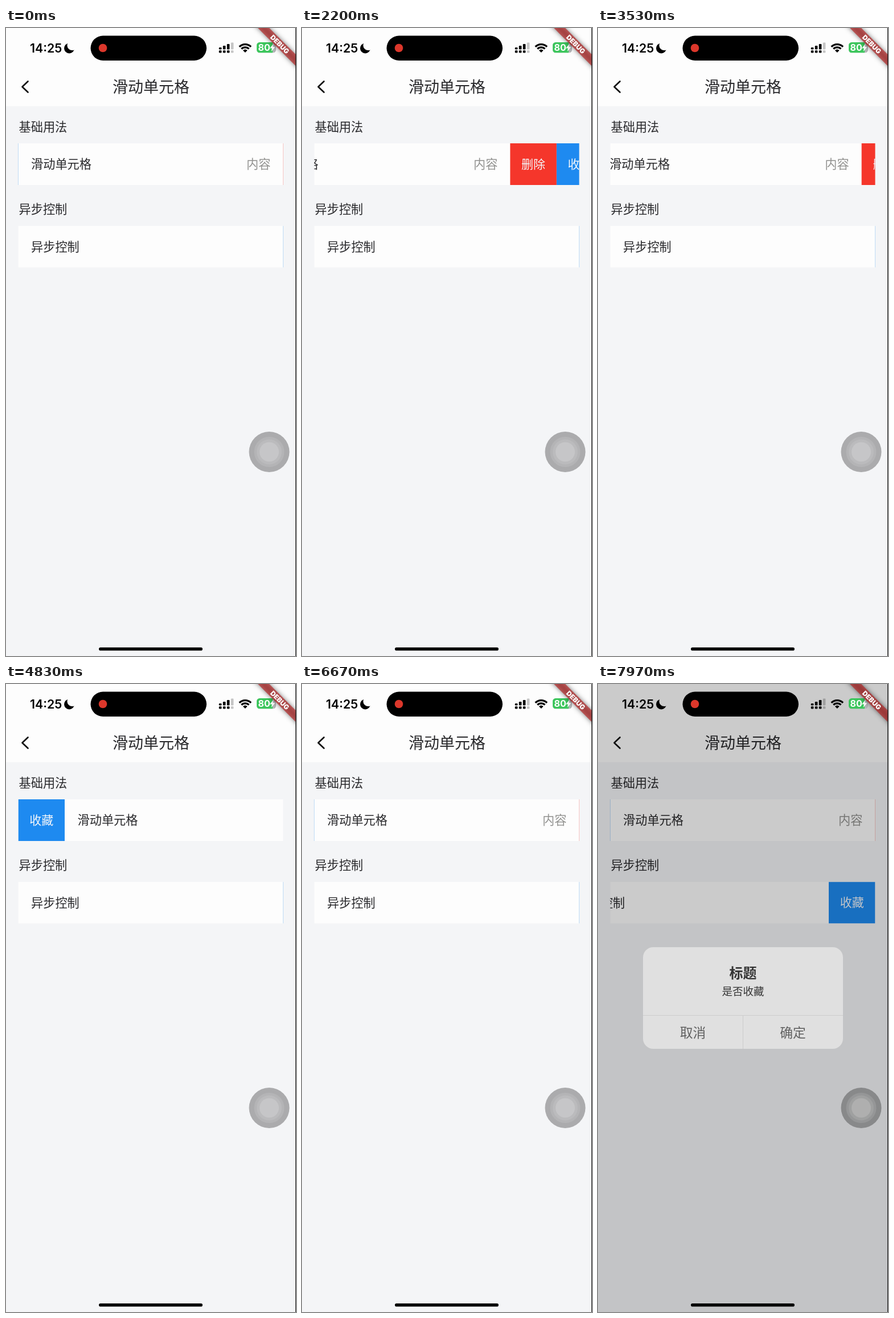
Write an HTML page with a canvas that moves like this. It is 509x1100 px and loops after 8 s.

```html
<!DOCTYPE html>
<html lang="zh-CN">
<head>
<meta charset="utf-8">
<title>滑动单元格</title>
<style>
html, body { margin: 0; width: 100%; height: 100%; overflow: hidden; background: #f4f5f7; }
canvas { display: block; width: 509px; height: 1100px; }
</style>
</head>
<body>
<canvas id="stage"></canvas>
<script>
const W = 509, H = 1100, LOOP = 8000;
const RED = '#f5362b', BLUE = '#1e8af0', INK = '#28282b', PAPER = '#fdfdfd';
const CARD = { x: 21.5, w: 465, h: 73 }, BTN = 81.5;
const CJK = '"Noto Sans CJK SC", "Noto Sans CJK", sans-serif';
const LATIN = 'Inter, sans-serif';

const canvas = document.getElementById('stage');
const ratio = window.devicePixelRatio || 1;
canvas.width = W * ratio;
canvas.height = H * ratio;
const c = canvas.getContext('2d');

// Each move: start, end, from, to
const firstMoves = [
  [1804, 2404, 0, -2 * BTN],
  [3306, 3606, -2 * BTN, 0],
  [4300, 4760, 0, BTN],
  [5480, 5800, BTN, 0]
];
const secondMoves = [[6900, 7350, 0, -BTN]];

const clamp = p => Math.min(1, Math.max(0, p));
const ease = p => (1 - Math.cos(Math.PI * p)) / 2;

function position(moves, t) {
  let x = 0;
  for (const [start, end, from, to] of moves) {
    if (t >= start) x = from + (to - from) * ease(clamp((t - start) / (end - start)));
  }
  return x;
}

function rect(x, y, w, h, color, r = 0) {
  c.fillStyle = color;
  c.beginPath();
  c.roundRect(x, y, w, h, r);
  c.fill();
}

function disc(x, y, r, color) {
  c.fillStyle = color;
  c.beginPath();
  c.arc(x, y, r, 0, 2 * Math.PI);
  c.fill();
}

function polygon(points, color) {
  c.fillStyle = color;
  c.beginPath();
  points.forEach(([x, y]) => c.lineTo(x, y));
  c.fill();
}

// y is the middle of the line
function text(s, x, y, size, color = INK, align = 'left', weight = 350) {
  c.font = `${weight} ${size}px ${CJK}`;
  c.textAlign = align;
  c.fillStyle = color;
  c.fillText(s, x, y + size * 0.38);
}

function latin(s, x, base, size, weight, color, align = 'left') {
  c.font = `${weight} ${size}px ${LATIN}`;
  c.textAlign = align;
  c.fillStyle = color;
  c.fillText(s, x, base);
}

function button(label, x, y, color) {
  rect(x, y, BTN, CARD.h, color);
  text(label, x + BTN / 2, y + 36, 21, '#f4f6fa', 'center');
}

function cell(y, dx, label, value, left, right) {
  c.save();
  c.beginPath();
  c.rect(CARD.x, y, CARD.w, CARD.h);
  c.clip();
  rect(CARD.x, y, CARD.w, CARD.h, PAPER);
  c.translate(dx, 0);
  text(label, 44, y + 36, 21.2);
  if (value) text(value, 464.5, y + 36, 21.2, '#929290', 'right');
  left.forEach(([s, color], i) => button(s, CARD.x - BTN * (i + 1), y, color));
  right.forEach(([s, color], i) => button(s, CARD.x + CARD.w + BTN * i, y, color));
  c.restore();
}

function page(t) {
  rect(0, 0, W, H, '#f4f5f7');
  rect(0, 0, W, 137, PAPER);
  c.strokeStyle = '#111';
  c.lineWidth = 2.7;
  c.lineCap = c.lineJoin = 'round';
  c.beginPath();
  c.moveTo(38.5, 93.5);
  c.lineTo(28.5, 103);
  c.lineTo(38.5, 112.5);
  c.stroke();
  text('滑动单元格', 254.5, 103, 27, INK, 'center');
  text('基础用法', 22.5, 172.5, 21.2);
  text('异步控制', 22.5, 317, 21.2);
  const star = ['收藏', BLUE];
  cell(202, position(firstMoves, t), '滑动单元格', '内容', [star], [['删除', RED], star]);
  cell(346.5, position(secondMoves, t), '异步控制', '', [], [star]);
}

function dialog(p) {
  const s = 0.76 + 0.24 * p;
  c.save();
  c.globalAlpha = clamp(p * 1.2);
  c.translate(254.5, 550);
  c.scale(s, s);
  c.translate(-254.5, -550);
  rect(79, 461, 351, 178, '#e0e0e0', 18);
  rect(79, 580, 351, 1, '#cccccc');
  rect(254, 580, 1, 59, '#cccccc');
  text('标题', 254.5, 506, 24, '#353535', 'center', 700);
  text('是否收藏', 254.5, 538, 18.5, '#353535', 'center');
  text('取消', 166.5, 610, 22.8, '#606060', 'center');
  text('确定', 342, 610, 22.8, '#606060', 'center');
  c.restore();
}

function moon() {
  c.save();
  c.beginPath();
  c.arc(111, 35.5, 9, 0, 2 * Math.PI);
  c.clip();
  c.beginPath();
  c.rect(100, 20, 24, 30);
  c.arc(116, 30.5, 8.6, 0, 2 * Math.PI);
  c.fillStyle = '#000';
  c.fill('evenodd');
  c.restore();
}

function signal() {
  [3.5, 6.5, 9.5, 12].forEach((h, i) => {
    const x = 373.8 + i * 7, color = i < 3 ? '#000' : 'rgba(0,0,0,.22)';
    rect(x, 37.5 - h, 4.6, h, color, 1.2);
    rect(x, 39.3, 4.6, 4.2, color, 1.2);
  });
}

function wifi() {
  const x = 419.8, y = 43, a = 0.79;
  c.strokeStyle = '#000';
  c.lineCap = 'butt';
  c.lineWidth = 3.2;
  for (const r of [14.4, 9.2]) {
    c.beginPath();
    c.arc(x, y, r, -Math.PI / 2 - a, -Math.PI / 2 + a);
    c.stroke();
  }
  c.fillStyle = '#000';
  c.beginPath();
  c.moveTo(x, y);
  c.arc(x, y, 5.4, -Math.PI / 2 - a, -Math.PI / 2 + a);
  c.fill();
}

function battery() {
  c.save();
  c.beginPath();
  c.roundRect(440, 25, 34, 18.5, 5.5);
  c.clip();
  rect(440, 25, 34, 18.5, '#b4b6b8');
  rect(440, 25, 28, 18.5, '#3cc65c');
  c.restore();
  latin('80', 442.5, 40.3, 16, 700, '#fff');
  polygon([[469.5, 27.5], [463, 35.5], [467, 35.5], [465.5, 41.5], [472.5, 33], [468.5, 33]], '#fff');
}

function statusBar() {
  latin('14:25', 42, 42.5, 21.3, 600, '#000');
  moon();
  rect(148.5, 13.5, 203.5, 43.5, '#000', 21.75);
  disc(170, 35, 7.3, '#dc372b');
  signal();
  wifi();
  battery();
}

function banner() {
  const k = W / 430, y = 28 * k, h = 12 * k;
  c.save();
  c.translate(W, 0);
  c.rotate(Math.PI / 4);
  c.filter = `blur(${4.4 * ratio}px)`;
  rect(-70, y, 140, h, 'rgba(0,0,0,.5)');
  c.filter = 'none';
  rect(-70, y, 140, h, 'rgba(183,28,28,.63)');
  latin('DEBUG', 0, y + h / 2 + 4.2, 11.8, 900, '#fff', 'center');
  c.restore();
}

function touchBall() {
  disc(462, 742.5, 35.5, 'rgba(0,0,0,.3)');
  disc(462, 742.5, 26.5, 'rgba(255,255,255,.11)');
  disc(462, 742.5, 22, 'rgba(255,255,255,.09)');
  disc(462, 742.5, 17, 'rgba(255,255,255,.16)');
}

function draw(t) {
  c.setTransform(ratio, 0, 0, ratio, 0, 0);
  page(t);
  const p = clamp((t - 7820) / 150);
  if (p > 0) {
    rect(0, 0, W, H, `rgba(0,0,0,${0.2 * p})`);
    dialog(1 - (1 - p) ** 2);
  }
  statusBar();
  banner();
  touchBall();
  rect(163, 1085, 182, 5.6, '#000', 2.8);
  rect(508, 0, 1, H, '#111');
}

const begin = performance.now();
function tick() {
  draw((performance.now() - begin) % LOOP);
  requestAnimationFrame(tick);
}
tick();
</script>
</body>
</html>
```
